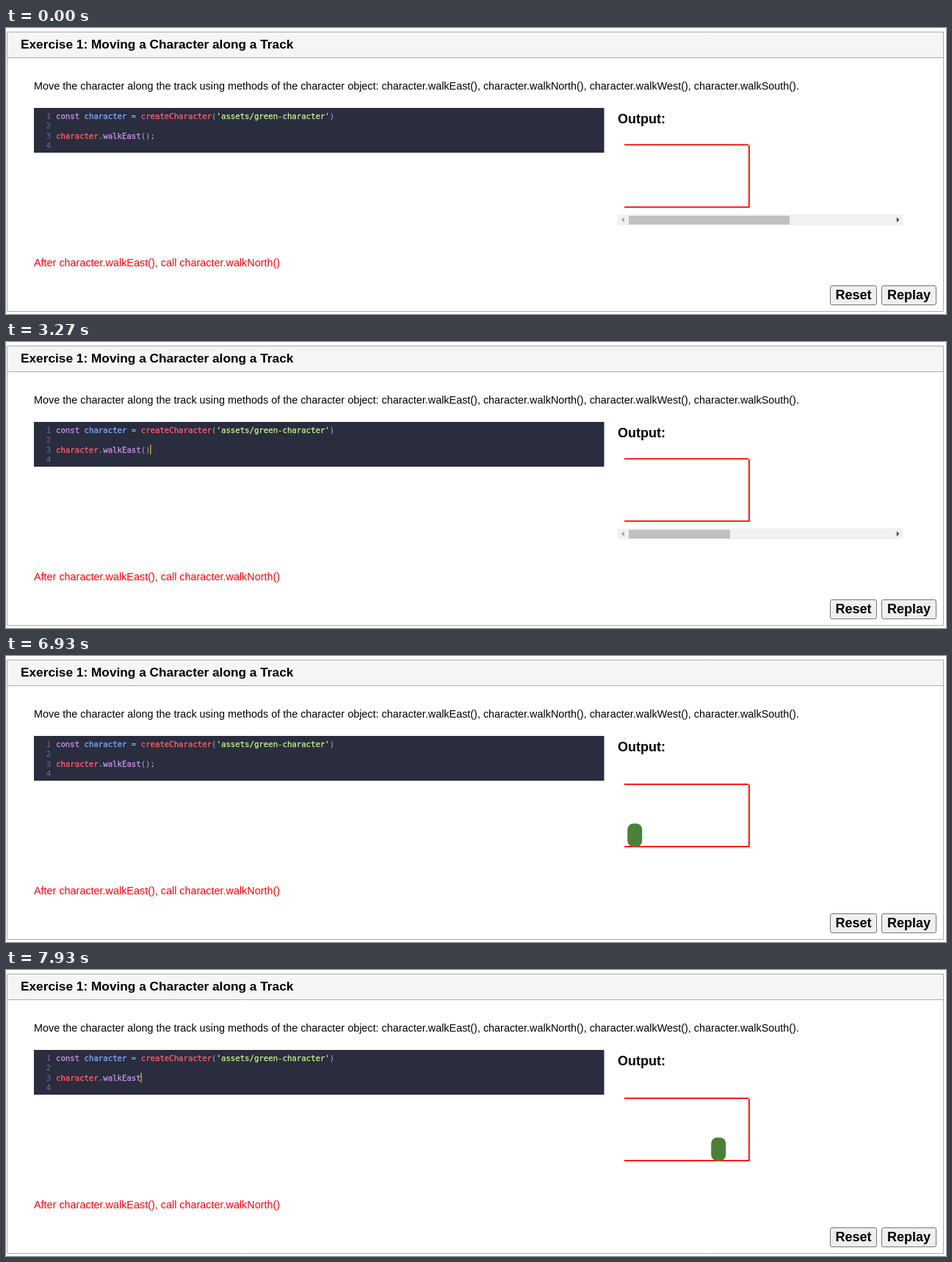
Write an HTML page with a canvas that moves like this. It is 1280 px wide and 390 px high and loops after 8 s.

```html
<!DOCTYPE html>
<html lang="en">
<head>
<meta charset="utf-8">
<title>Track exercise</title>
<style>
  html, body { margin: 0; width: 100%; height: 100%; overflow: hidden; background: #fff; }
  canvas, svg { position: absolute; left: 0; top: 0; width: 1280px; height: 390px; }
  text { font: 14.4px "Liberation Sans", Arial, sans-serif; fill: #000; white-space: pre; }
  .title { font-size: 17.28px; font-weight: bold; }
  .head { font-size: 18px; font-weight: bold; }
  .mid { text-anchor: middle; }
  #error { fill: #f00; }
  .code text { font: 10.68px "DejaVu Sans Mono", monospace; fill: #a6accd; }
  .code .num { fill: #676e95; }
  .key { fill: #c792ea; stroke: #c792ea; }
  .def { fill: #82aaff; stroke: #82aaff; }
  .op { fill: #89ddff; }
  .var { fill: #ff5f70; stroke: #ff5f70; }
  .str { fill: #c8f08d; stroke: #c8f08d; }
  tspan { stroke-width: 0.3px; }
</style>
</head>
<body>
<canvas id="stage" width="1280" height="390"></canvas>
<svg viewBox="0 0 1280 390">
  <text class="title" x="20" y="28">Exercise 1: Moving a Character along a Track</text>
  <text x="38" y="83.7">Move the character along the track using methods of the character object: character.walkEast(), character.walkNorth(), character.walkWest(), character.walkSouth().</text>
  <text class="head" x="833" y="129.5">Output:</text>
  <text id="error" x="38" y="325">After character.walkEast(), call character.walkNorth()</text>
  <text class="head mid" x="1154" y="370">Reset</text>
  <text class="head mid" x="1229.5" y="370">Replay</text>
  <g class="code">
    <text class="num" x="54.8" y="123.6">1</text>
    <text class="num" x="54.8" y="137">2</text>
    <text class="num" x="54.8" y="150.5">3</text>
    <text class="num" x="54.8" y="163.9">4</text>
    <text x="68" y="123.6"><tspan class="key">const</tspan> <tspan class="def">character</tspan> <tspan class="op">=</tspan> <tspan class="var">createCharacter</tspan>(<tspan class="str">'assets/green-character'</tspan>)</text>
    <text x="68" y="150.5"><tspan class="var">character</tspan>.<tspan class="key">walkEast</tspan><tspan id="tail">();</tspan></text>
  </g>
</svg>
<script>
const LOOP = 8000, STEP = 200 / 3, BLINK = 530;
const SPEED = 0.114;              // walking speed, px per ms
const RELOAD = 6850, WALK = 6900; // output restarts, then the walk begins
const TAIL = "();", TAIL_X = 183.7, CHAR_W = 6.43;

// [time, characters left of the caret after "walkEast"]
const EDITS = [
  [2130, 3], [3060, 2], [3400, 1], [3600, 0],
  [4550, 1], [4720, 2], [5325, 3],
  [7520, 2], [7700, 1], [7870, 0]
];

const ctx = document.getElementById("stage").getContext("2d");
const tail = document.getElementById("tail");
const error = document.getElementById("error");

function rect(x, y, w, h, color) {
  ctx.fillStyle = color;
  ctx.fillRect(x, y, w, h);
}

function frame(x, y, w, h, fill, line, radius = 0) {
  ctx.beginPath();
  ctx.roundRect(x + 0.5, y + 0.5, w - 1, h - 1, radius);
  ctx.fillStyle = fill;
  ctx.fill();
  ctx.lineWidth = 1;
  ctx.strokeStyle = line;
  ctx.stroke();
}

function arrow(tip, dir, color) {
  ctx.fillStyle = color;
  ctx.beginPath();
  ctx.moveTo(tip, 261.5);
  ctx.lineTo(tip - 3.7 * dir, 258);
  ctx.lineTo(tip - 3.7 * dir, 265);
  ctx.fill();
}

function drawPage() {
  rect(0, 0, 1280, 390, "#fff");
  frame(1, 5, 1276, 382, "#fff", "#aaa");
  frame(1, 5, 1276, 36, "#f5f5f5", "#aaa");
  rect(38, 109, 776.5, 61, "#292d3e");
  frame(1122, 351, 64, 27, "#efefef", "#767676", 2.5);
  frame(1192, 351, 75, 27, "#efefef", "#767676", 2.5);
}

function drawTrack(y) {
  rect(842, y, 169, 1.8, "#f00");
  rect(1011, y + 1.5, 1.8, 85, "#f00");
  rect(842, y + 85, 170, 1.8, "#f00");
}

// The thumb shrinks as the walker widens the scrollable area.
function drawScrollbar(t) {
  rect(833, 254, 388, 15, "#f1f1f1");
  rect(848, 256, 139000 / (634.7 + SPEED * t), 12, "#c1c1c1");
  arrow(838, -1, "#a3a3a3");
  arrow(1216.5, 1, "#505050");
}

function drawWalker(t) {
  const x = 856.2 + SPEED * (t - 6933);
  ctx.fillStyle = "#4a8038";
  ctx.beginPath();
  ctx.roundRect(x - 10, 228.5, 20, 31.5, 8);
  ctx.fill();
}

function drawEditor(t) {
  const edit = EDITS.filter(e => e[0] <= t).pop();
  const count = edit ? edit[1] : TAIL.length;
  tail.textContent = TAIL.slice(0, count);
  if (edit && Math.floor((t - edit[0]) / BLINK) % 2 === 0)
    rect(TAIL_X + count * CHAR_W - 0.2, 140, 1.1, 13.5, "#fc0");
}

function draw(t) {
  const reloaded = t >= RELOAD;
  drawPage();
  drawEditor(t);
  drawTrack(reloaded ? 174 : 158.4);
  if (!reloaded) drawScrollbar(t);
  if (t >= WALK) drawWalker(t);
  error.style.visibility = reloaded && t < WALK ? "hidden" : "visible";
}

// The picture advances at 15 steps per second.
function tick(now) {
  draw(Math.floor((now % LOOP + 4) / STEP) * STEP % LOOP);
  requestAnimationFrame(tick);
}

draw(0);
requestAnimationFrame(tick);
</script>
</body>
</html>
```
